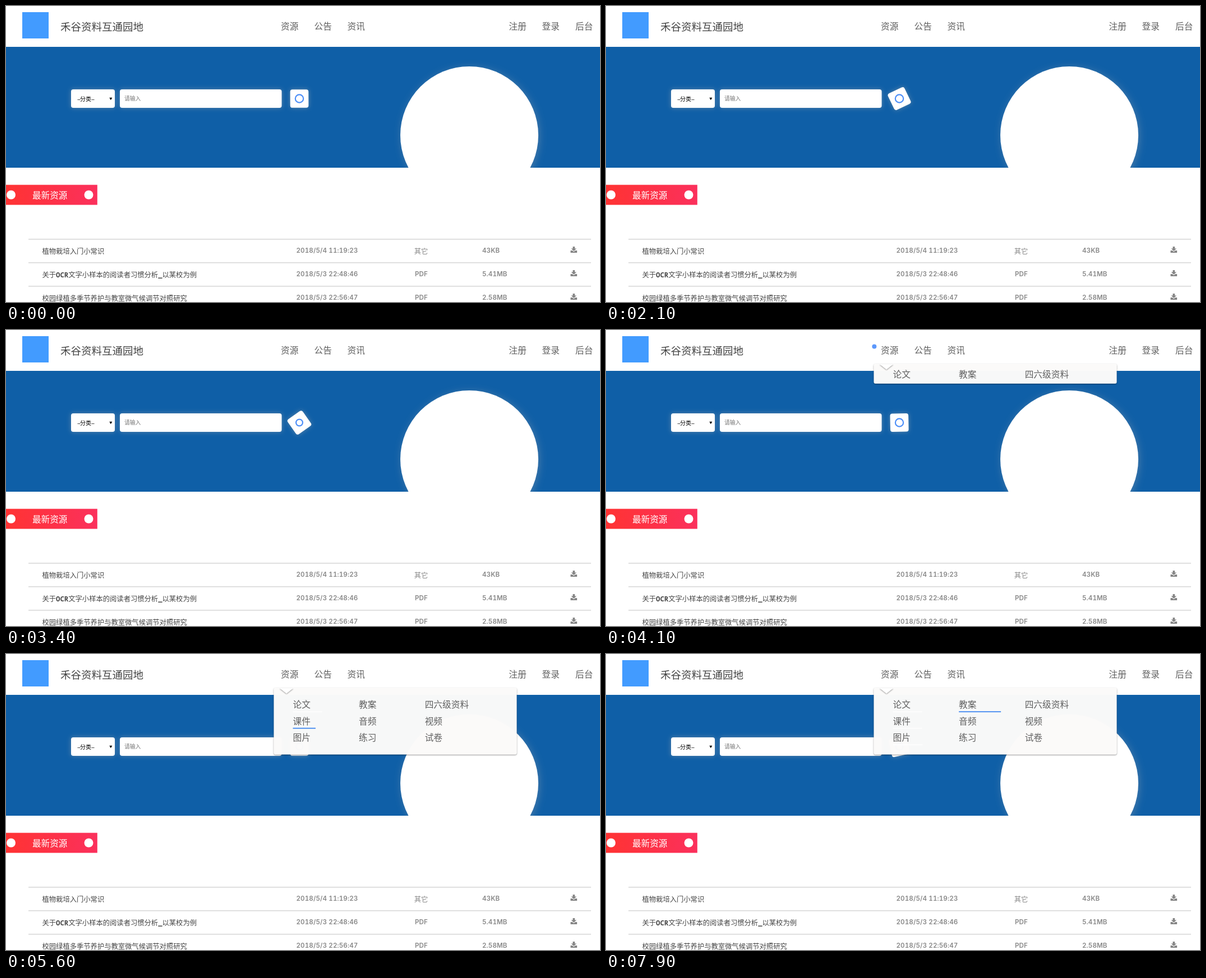
An HTML page for the animation above (8000 ms loop, 1059 by 529 pixels).

```html
<!DOCTYPE html>
<html lang="zh-CN">
<head>
<meta charset="utf-8">
<title>资料平台</title>
<style>
html, body { margin: 0; width: 100%; height: 100%; overflow: hidden; background: #fff; }
svg { display: block; width: 1059px; height: 529px; }
text { font-family: "Noto Sans CJK SC", "Noto Sans CJK", "Noto Sans CJK JP", sans-serif; }
.nav { font-size: 15.7px; font-weight: 300; fill: #606060; }
.name { font-size: 12.3px; fill: #444; }
.mono { font-family: "Noto Sans Mono", "DejaVu Sans Mono", monospace; font-weight: 700; }
.meta { font: 600 11.6px Inter, sans-serif; font-variant-numeric: tabular-nums; letter-spacing: .1px; fill: #888; }
.kind { font-size: 12.3px; font-weight: 300; fill: #888; }
</style>
</head>
<body>
<svg id="stage" viewBox="0 0 1059 529" xmlns="http://www.w3.org/2000/svg">
  <defs>
    <linearGradient id="red"><stop stop-color="#ff3333"/><stop offset="1" stop-color="#fb305c"/></linearGradient>
    <filter id="glow" x="-50%" y="-50%" width="200%" height="200%">
      <feDropShadow dx="0" dy="0" stdDeviation="4" flood-color="#aaa" flood-opacity=".48"/>
    </filter>
    <filter id="bigGlow" x="-20%" y="-20%" width="140%" height="140%">
      <feDropShadow dx="2" dy="2" stdDeviation="7" flood-color="#aaa" flood-opacity=".35"/>
    </filter>
    <filter id="shade" x="-10%" y="-10%" width="120%" height="130%">
      <feDropShadow dx="0" dy="1" stdDeviation="1.3" flood-color="#000" flood-opacity=".5"/>
    </filter>
    <clipPath id="bannerClip"><rect y="73" width="1059" height="216"/></clipPath>
    <clipPath id="panelClip"><rect id="panelCut" x="470" y="60" width="450"/></clipPath>
  </defs>

  <rect width="1059" height="529" fill="#fff"/>
  <rect x="29" y="11" width="47" height="47" fill="#429bff"/>
  <text x="97" y="43.5" font-size="18.5" fill="#444">禾谷资料互通园地</text>
  <g id="nav"></g>

  <g clip-path="url(#bannerClip)">
    <rect y="72" width="1059" height="217" fill="#0f5fa7"/>
    <circle cx="826" cy="231" r="123" fill="#fff" filter="url(#bigGlow)"/>
  </g>
  <g fill="#fff" filter="url(#glow)">
    <rect x="116" y="149" width="78" height="33" rx="4"/>
    <rect x="203" y="149" width="288.5" height="33" rx="4"/>
  </g>
  <text x="127" y="169.8" font-size="10" fill="#000"><tspan letter-spacing="-1">--</tspan>分类<tspan letter-spacing="-1">--</tspan></text>
  <path d="M184.3 163.8h5l-2.5 4.4z" fill="#000"/>
  <text x="211" y="169.4" font-size="9.8" fill="#757575">请输入</text>
  <g filter="url(#glow)"><rect id="button" x="506.7" y="149.2" width="32.6" height="32.6" rx="4" fill="#fff"/></g>
  <circle id="ring" cx="523" cy="165.5" fill="none" stroke="#4d8ff8" stroke-width="2.2"/>

  <rect y="319.6" width="162.8" height="35.8" fill="url(#red)"/>
  <circle cx="9" cy="337.5" r="8" fill="#fff"/>
  <circle cx="147.5" cy="337.5" r="8" fill="#fff"/>
  <text x="47" y="343.9" font-size="15.6" fill="#fff">最新资源</text>
  <g id="rows"></g>

  <g id="panel">
    <rect id="sheet" x="477.5" y="60.5" width="433" rx="3" fill="#fdfcfb" fill-opacity=".97" filter="url(#shade)"/>
    <path d="M488 61H512L500 70.5Z" fill="#fff" filter="url(#shade)"/>
    <path d="M486 61h28" stroke="#fafafa" stroke-width="1.5"/>
    <g clip-path="url(#panelClip)"><g id="items"></g></g>
  </g>
</svg>
<script>
const LOOP = 8000, STEP = 100;
const $ = id => document.getElementById(id);

function add(parent, tag, attrs, html = "") {
  const el = document.createElementNS("http://www.w3.org/2000/svg", tag);
  for (const k in attrs) el.setAttribute(k, attrs[k]);
  el.innerHTML = html;
  parent.appendChild(el);
  return el;
}
const set = (el, attrs) => { for (const k in attrs) el.setAttribute(k, attrs[k]); };

// cubic-bezier(.25, .1, .25, 1)
function ease(x) {
  if (x <= 0) return 0;
  if (x >= 1) return 1;
  let lo = 0, hi = 1, u = x;
  for (let i = 0; i < 24; i++) {
    u = (lo + hi) / 2;
    const bx = .75 * u * (1 - u) + u ** 3;
    if (bx < x) lo = u; else hi = u;
  }
  return .3 * u * (1 - u) ** 2 + 3 * u * u * (1 - u) + u ** 3;
}

// label, x, hover start, hover end
const links = [
  ["资源", 490, 3900, 4800], ["公告", 549.5, 3700, 3900], ["资讯", 608.5, 2900, 3300],
  ["注册", 896.5, 1100, 1450], ["登录", 955.5, 1450, 1800], ["后台", 1015, 1850, 2000]
].map(([label, x, on, off]) => {
  add($("nav"), "text", { x, y: 42, class: "nav" }, label);
  const dot = add($("nav"), "circle", { cx: x - 11.7, cy: 29.5, r: 0, fill: "#5d98fb" });
  return { dot, on, off };
});

const mono = s => `<tspan class="mono">${s}</tspan>`;
[
  ["植物栽培入门小常识", "2018/5/4 11:19:23", "其它", "43KB"],
  [`关于${mono("OCR")}文字小样本的阅读者习惯分析${mono("_")}以某校为例`, "2018/5/3 22:48:46", "PDF", "5.41MB"],
  ["校园绿植多季节养护与教室微气候调节对照研究", "2018/5/3 22:56:47", "PDF", "2.58MB"]
].forEach(([name, date, kind, size], i) => {
  const g = add($("rows"), "g", { transform: `translate(0 ${i * 42})` });
  add(g, "path", { d: "M40 416.7H1043", stroke: "#d6d6d6", "stroke-width": 1.5 });
  add(g, "text", { x: 64.5, y: 443, class: "name" }, name);
  add(g, "text", { x: 517.5, y: 441.3, class: "meta" }, date);
  const latin = kind === "PDF";
  add(g, "text", { x: latin ? 729 : 727.7, y: latin ? 441.3 : 442.7, class: latin ? "meta" : "kind" }, kind);
  add(g, "text", { x: 849, y: 441.3, class: "meta" }, size);
  add(g, "path", {
    d: "M1010.5 430h3.6v3.4h3l-4.8 4.6-4.8-4.6h3zM1006.5 437h3.2l2.6 2.3 2.6-2.3h3.2v4h-11.6z",
    fill: "#858585"
  });
});

// underline timing: start, end, full width
const hovers = {
  "论文": [4800, 5400, 52], "课件": [5400, 6500, 52],
  "图片": [6500, 7350, 53], "教案": [7400, 9000, 75]
};
const lines = [];
[["论文", "课件", "图片"], ["教案", "音频", "练习"], ["四六级资料", "视频", "试卷"]].forEach((col, c) =>
  col.forEach((label, r) => {
    const x = 511.5 + c * 117.6, y = 96.4 + r * 29.5;
    add($("items"), "text", { x, y, class: "nav" }, label);
    if (!hovers[label]) return;
    const [on, off, full] = hovers[label];
    const box = { x, y: y + 5.9, height: 1.8 };
    const trail = add($("items"), "rect", { ...box, width: full, fill: "#fff" });
    const bar = add($("items"), "rect", { ...box, width: 0, fill: "#4288f0" });
    lines.push({ trail, bar, on, off, full });
  }));

function draw(t) {
  const spin = (t / 1400 + .925) % 1;
  set($("button"), { transform: `rotate(${90 * ease(spin)} 523 165.5)` });
  set($("ring"), { r: 6.5 + .7 * Math.cos(2 * Math.PI * t / 2130) });

  for (const { dot, on, off } of links)
    set(dot, { r: 4 * ease((t - on + 100) / 200) * (1 - ease((t - off) / 100)) });

  const open = ease((t - 4000) / 500);
  set($("panel"), { visibility: open > 0 ? "visible" : "hidden" });
  set($("sheet"), { height: 119 * open });
  set($("panelCut"), { height: 120 * open });
  set($("items"), { transform: `translate(0 ${-16 * (1 - open)})` });

  for (const { trail, bar, on, off, full } of lines) {
    set(bar, { width: full * ease((t - on) / 420) * (1 - ease((t - off) / 180)) });
    set(trail, { opacity: t > off ? .8 : 0 });
  }
}

function tick() {
  draw(Math.floor(performance.now() % LOOP / STEP) * STEP);
  requestAnimationFrame(tick);
}
tick();
</script>
</body>
</html>
```
